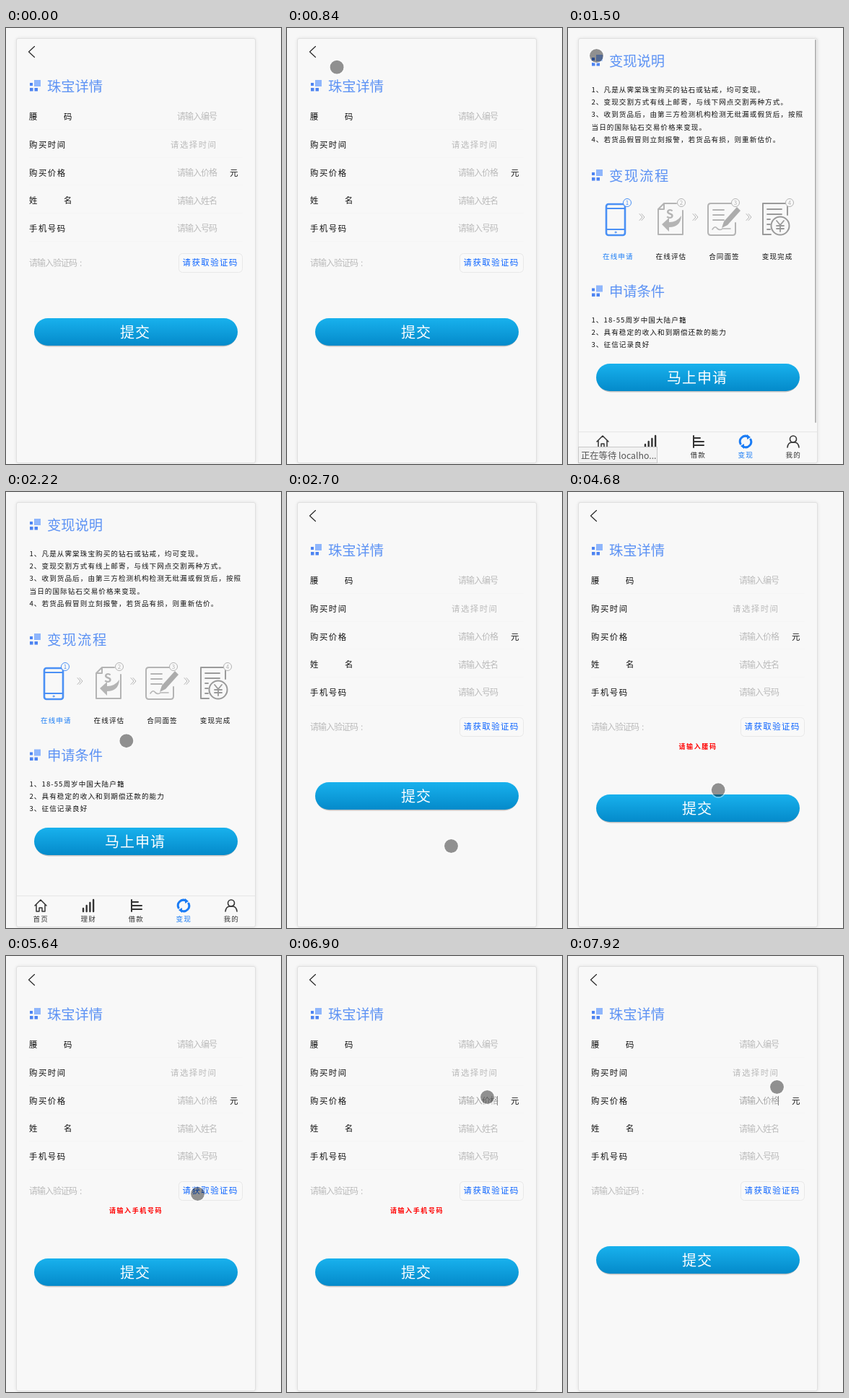
Recreate the animation shown at these times as an HTML page. Size 381x604 px, loop 8 s.

```html
<!DOCTYPE html>
<html lang="zh-CN">
<head>
<meta charset="utf-8">
<style>
html, body { margin: 0; height: 100%; overflow: hidden; background: #f7f7f7; }
svg { display: block; width: 381px; height: 604px; font-family: "Noto Sans CJK SC", "Noto Sans CJK", sans-serif; }
.line { fill: none; stroke-linecap: round; stroke-linejoin: round; }
</style>
</head>
<body>
<svg viewBox="0 0 381 604">
  <defs>
    <linearGradient id="blue" x2="0" y2="1">
      <stop stop-color="#18b1ed"/><stop offset="1" stop-color="#048aca"/>
    </linearGradient>
    <filter id="soft" x="-10%" y="-10%" width="120%" height="120%"><feGaussianBlur stdDeviation="2"/></filter>
  </defs>
  <rect x="14" y="14" width="332" height="589" rx="3" opacity=".09" filter="url(#soft)"/>
  <rect x="14.5" y="14.5" width="331" height="588" rx="2.5" fill="#f8f8f8" stroke="#e0e0e0"/>
  <g id="form"></g>
  <g id="cash"></g>
  <g id="pointer">
    <circle r="9.5" fill-opacity=".42"/>
    <circle r="10.2" fill="none" stroke="#fff" stroke-opacity=".45" stroke-width="1.4"/>
  </g>
</svg>
<script>
const $ = id => document.getElementById(id);
const repeat = (items, draw) => items.map(draw).join('');

// Text placed by left edge and vertical centre.
const text = (x, y, str, size = 11.4, gap = 1.5, fill = '#111', more = '') =>
  `<text x="${x}" y="${y + size * .38}" font-size="${size}" letter-spacing="${gap}" fill="${fill}" ${more}>${str}</text>`;
const hint = (x, y, str, more = '') => text(x, y, str, 12, -1, '#bbb', more);
const small = (x, y, str, fill) => text(x, y, str, 9.6, 1.05, fill);
const rect = (x, y, w, h, fill, more = '') =>
  `<rect x="${x}" y="${y}" width="${w}" height="${h}" fill="${fill}" ${more}/>`;
const line = (d, color, width = 2) =>
  `<path class="line" d="${d}" stroke="${color}" stroke-width="${width}"/>`;
const shape = (d, color) => `<path d="${d}" fill="${color}"/>`;
const ring = (r, color, width, x = 0, y = 0) =>
  `<circle class="line" cx="${x}" cy="${y}" r="${r}" stroke="${color}" stroke-width="${width}"/>`;
const at = (x, y, art) => `<g transform="translate(${x} ${y})">${art}</g>`;

const heading = (y, str, gap = 0) =>
  at(33, y, rect(6, -8, 9, 9, '#8fb6fc') + rect(0, -4, 4, 4, '#4c83f1') +
    repeat([0, 6.5], x => rect(x, 3, 4.5, 4.5, '#4c83f1'))) +
  text(57, y + .6, str, 19.3, gap, '#5c92f4');

const button = (y, x, str) =>
  rect(40, y + 1.5, 280, 38, '#000', 'rx="19" opacity=".22"') +
  rect(39, y, 282, 38, 'url(#blue)', 'rx="19"') +
  text(x, y + 19, str, 20, 1, '#fff');

// Form page
const rowY = i => 122.7 + 38.8 * i;
const halves = i => text(80, rowY(i), i ? '名' : '码');
$('form').innerHTML =
  line('M39.5 25.5L31.5 33L39.5 40.5', '#222', 1.1) + heading(80, '珠宝详情') +
  repeat(['腰', '购买时间', '购买价格', '姓', '手机号码'], (label, i) =>
    text(32, rowY(i), label) + rect(32, Math.round(rowY(i) + 17), 296, 1, '#f5f5f5')) +
  halves(0) + halves(3) +
  repeat(['编号', '', '价格', '姓名', '号码'], (what, i) =>
    what ? hint(237, rowY(i), '请输入' + what, `id="hint${i}"`)
         : text(228, rowY(i), '请选择时间', 11.4, 1.5, '#bbb')) +
  text(310, rowY(2), '元') +
  hint(32, 325, '请输入验证码') + hint(102, 325, ':') +
  rect(239.5, 312.5, 88, 26, '#f9f9f9', 'rx="5" stroke="#e8e8e8"') +
  text(244.5, 325, '请获取验证码', 11.4, 1.5, '#0a63ff') +
  rect(291, 194, 1, 13, '#888', 'id="caret"') +
  text(180, 353, '', 9, 1.6, '#f00', 'id="error" text-anchor="middle" font-weight="bold"') +
  `<g id="submit">${button(402, 158, '提交')}</g>`;

// Cash-out page
const azure = '#1a7cf5', silver = '#b4b4b4', steel = '#9a9a9a', ink = '#333';
const notes = (y, lines) => repeat(lines, (str, i) => small(32.5, y + 17.3 * i, str));
const rules = (x, ys, width, color) => line(repeat(ys, y => `M${x} ${y}h${width}`), color, 1.8);

// Step icons, drawn around their own centre
const steps = [
  ['在线申请', rect(-13, -21, 26, 43, 'none', 'rx="3" stroke="#4a90f5" stroke-width="2.6"') +
    rules(-13, [-15, 14], 26, '#4a90f5') + ring(1, '#4a90f5', 1, 0, 18)],
  ['在线评估', line('M10-22H-7L-15-14V21H19V-12M-7-22V-14H-15', silver) +
    text(1, -7, 'S', 17, 0, silver, 'text-anchor="middle" font-weight="bold"') +
    shape('M-10 7L0-2V4Q11 4 17-5Q16 11 0 11V17Z', silver)],
  ['合同面签', line('M13-22H-16Q-20-22-20-18V18Q-20 22-16 22H14Q18 22 18 18V5', silver) +
    rules(-13, [-13, -6, 1], 15, silver) +
    shape('M-1 12L2 3L20-17L25-12L7 8Z', '#acacac') +
    line('M-14 14q4-6 7-1q4 3 7 0h11', silver, 1.6)],
  ['变现完成', line('M-7 21H-18V-22H16V-6', steel) + rules(-12, [-14, -7], 20, steel) +
    rules(-12, [0, 7, 14], 4, steel) + ring(12.5, steel, 2, 6, 9) +
    line('M1 2l5 6l5-6M6 8v9M1 9h10M1 13h10', steel, 1.8)]
];
const drawStep = ([label, art], i) => {
  const color = i ? silver : '#4a90f5', x = 82 + 75 * i;
  return at(66 + 74 * i, 265, art) +
    `<circle cx="${x}" cy="242" r="5.5" fill="#f8f8f8" stroke="${color}"/>` +
    text(x, 242, i + 1, 8, 0, color, 'text-anchor="middle"') +
    small(48 + 73.6 * i, 316, label, i ? '#111' : azure) +
    (i < 3 ? at(99 + 74 * i, 262, repeat([0, 3], dx => line(`M${dx}-4.5l4 4.5l-4 4.5`, silver, 1))) : '');
};

const half = line('M-7 3A7.5 7.5 0 0 1 3-7', azure, 3) + shape('M2-10L7-6L2-3Z', azure);
const tabs = [
  ['首页', line('M-8 0L0-8L8 0M-6-1V8H-2V3H2V8H6V-1', ink, 1.5)],
  ['理财', line(repeat([0, 1, 2, 3], k => `M${k * 4.7 - 7} 8v${-4 - 4 * k}`), ink, 2.4)],
  ['借款', line('M-6-8V8' + repeat([-5, 0, 5], y => `M-5 ${y}H${y < 0 ? 3 : 8}`), ink, 2)],
  ['变现', half + `<g transform="rotate(180)">${half}</g>`, azure],
  ['我的', ring(4.5, ink, 1.6, 0, -3.5) + line('M-8 8Q-7 1-2 1H2Q7 1 8 8', ink, 1.6)]
];
const drawTab = ([label, art, color = ink], i) =>
  at(48 + 66 * i, 573, art) + small(37.5 + 66 * i, 591, label, color);

$('cash').innerHTML =
  heading(45, '变现说明') +
  notes(85, ['1、凡是从霁棠珠宝购买的钻石或钻戒，均可变现。',
    '2、变现交割方式有线上邮寄，与线下网点交割两种方式。',
    '3、收到货品后，由第三方检测机构检测无纰漏或假货后，按照',
    '当日的国际钻石交易价格来变现。',
    '4、若货品假冒则立刻报警，若货品有损，则重新估价。']) +
  heading(204, '变现流程', 1.7) + repeat(steps, drawStep) +
  heading(364.5, '申请条件') +
  notes(404, ['1、18-55周岁中国大陆户籍', '2、具有稳定的收入和到期偿还款的能力', '3、征信记录良好']) +
  button(465, 137, '马上申请') +
  rect(15, 559, 330, 1, '#e6e6e6') + repeat(tabs, drawTab) +
  rect(342, 16, 2, 531, '#b8b8b8', 'id="scrollbar" rx="1"') +
  `<g id="status">${rect(14.5, 580.5, 109, 22, '#f2f2f2', 'stroke="#c8c8c8"')}${text(18, 592, '正在等待 localho...', 12.3, 0, '#555')}</g>`;

// Pointer glides: start, end, destination
const entry = [349, 118];
const glides = [
  [360, 960, 39, 47], [1080, 1200, 39, 38], [1740, 2520, 227, 490], [2760, 3180, 165, 308],
  [3180, 3420, 261, 213], [3420, 3840, 203, 425], [3840, 3960, 199, 462], [4080, 4380, 203, 434],
  [4560, 4980, 228, 319], [5100, 5640, 265, 329], [5640, 6300, 288, 227], [6300, 6660, 277, 195],
  [7500, 7680, 291, 191], [7800, 7920, 289, 181]
];
const clamp = v => Math.max(0, Math.min(1, v));
const ease = k => (1 - Math.cos(Math.PI * k)) / 2;

function pointerAt(t) {
  let [x, y] = entry;
  for (const [start, end, toX, toY] of glides) {
    const k = ease(clamp((t - start) / (end - start)));
    x += (toX - x) * k;
    y += (toY - y) * k;
  }
  return [x + .5, y + .5];
}

const show = (id, on) => $(id).setAttribute('display', on ? 'inline' : 'none');

function draw(now) {
  const t = Math.floor(now % 8000 / 60) * 60;
  const onCash = t >= 1440 && t < 2640;
  const failed = t >= 4140 && t < 6960;
  const focused = t >= 6840;

  show('form', !onCash);
  show('cash', onCash);
  show('status', t >= 1500 && t < 1800);
  $('scrollbar').setAttribute('opacity', clamp((2160 - t) / 300));

  $('error').textContent = failed ? (t < 5580 ? '请输入腰码' : '请输入手机号码') : '';
  $('submit').setAttribute('transform', `translate(0 ${failed ? 17 : 0})`);
  show('caret', focused && Math.floor((t - 6840) / 510) % 2 === 0);
  $('hint2').setAttribute('fill', focused ? '#a8a8a8' : '#bbb');

  show('pointer', t >= 360);
  $('pointer').setAttribute('transform', `translate(${pointerAt(t)})`);
  requestAnimationFrame(draw);
}
requestAnimationFrame(draw);
</script>
</body>
</html>
```
